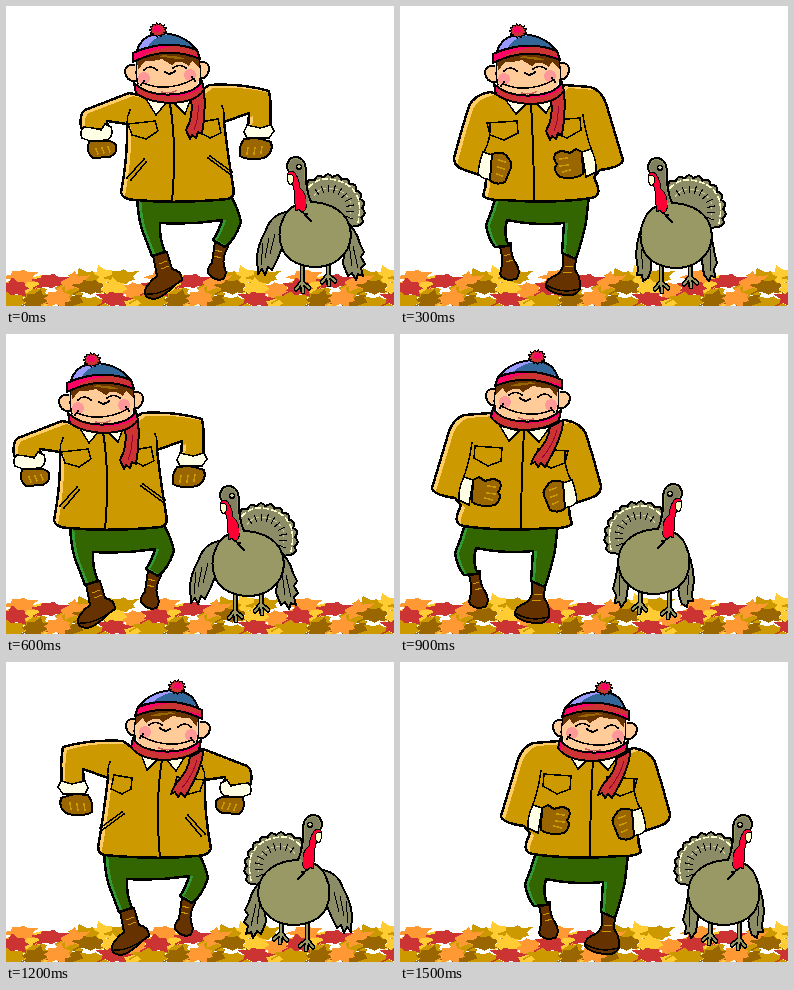
An HTML page for the animation above (1800 ms loop, 388 by 300 pixels).

```html
<!DOCTYPE html>
<html lang="en">
<head>
<meta charset="utf-8">
<title>Autumn dance</title>
<style>
html, body { margin: 0; width: 100%; height: 100%; overflow: hidden; background: #fff; }
svg { display: block; width: 388px; height: 300px; }
.pose { visibility: hidden; }
.ink { stroke: #000; stroke-width: 2; stroke-linejoin: round; stroke-linecap: round; }
.line { fill: none; stroke: #000; stroke-width: 1.5; stroke-linecap: round; stroke-linejoin: round; }
</style>
</head>
<body>
<svg id="stage" viewBox="0 0 388 300" shape-rendering="crispEdges"></svg>
<script>
const GOLD = '#cc9900', CREAM = '#ffffe6', RED = '#cc3333', PINK = '#ff0066', SKIN = '#ffcc99',
      GLOVE = '#996600', PANTS = '#336600', BOOT = '#663300', BIRD = '#999966', PLUME = '#8c8c66';

const ink = (fill, d, width = 2) =>
  `<path class="ink" fill="${fill}" style="stroke-width:${width}" d="${d}"/>`;
const line = (d, color = '#000', width = 1.5, extra = '') =>
  `<path class="line" style="stroke:${color};stroke-width:${width}" d="${d}" ${extra}/>`;
const flat = (fill, d) => `<path fill="${fill}" d="${d}"/>`;
const dot = (x, y, r, fill) => `<circle cx="${x}" cy="${y}" r="${r}" fill="${fill}"/>`;
const shift = (x, y, body) => `<g transform="translate(${x} ${y})">${body}</g>`;
// Mirrored parts land at x' = x - old position.
const place = (flip, x, y, body) =>
  `<g transform="translate(${x} ${y})${flip ? ' scale(-1 1)' : ''}">${body}</g>`;

// A shape lit from the left of the stage, also when it is mirrored.
const clips = {};
function lit(id, d, base, light, flip, dx, dy, width) {
  clips[id] = d;
  return flat(light, d)
    + `<g clip-path="url(#${id})">${shift(flip ? -dx : dx, dy, flat(base, d))}</g>`
    + ink('none', d, width);
}

// wave makes the spikes uneven.
function star(x, y, r, spikes, inner, turn, squash, wave = 0) {
  const pts = [];
  for (let i = 0; i < spikes * 2; i++) {
    const a = turn + i * Math.PI / spikes;
    const q = r * (i % 2 ? inner : 1 - wave + wave * Math.cos(i * 2.1));
    pts.push((x + q * Math.cos(a)).toFixed(1) + ' ' + (y + q * Math.sin(a) * squash).toFixed(1));
  }
  return 'M' + pts.join('L') + 'Z';
}

// Leaf carpet: one short tile, repeated.
function leaves() {
  const tints = { r: RED, o: '#ff9933', y: '#ffcc33', g: GOLD, b: GLOVE };
  const tile = [
    ['g', 6, 296], ['y', 32, 297], ['b', 66, 296], ['g', 88, 298], ['y', 128, 296], ['g', 140, 290],
    ['g', 62, 283], ['o', 128, 284], ['g', 28, 286], ['y', 25, 277], ['o', 15, 271], ['y', 98, 270],
    ['g', 116, 271], ['g', 80, 272], ['o', 68, 276], ['b', 84, 281], ['y', 108, 282], ['r', 44, 275],
    ['r', 9, 282], ['b', 30, 294], ['r', 108, 293], ['o', 52, 292]
  ];
  let out = '';
  for (let k = -1; k < 3; k++)
    tile.forEach(([c, x, y], i) => {
      out += flat(tints[c], star(x + k * 142, y, 20, 7, .55, i * 1.3, .55, .2));
      out += line(`M${x + k * 142 - 9} ${y + 3}l-7 4`, tints[c]);
    });
  return out;
}

const coats = {
  out: {
    shape: 'M146 92L123 87 79 104Q73 108 75 122L102 124 101 115 121 118Q122 150 115 187Q118 194 130 194Q170 198 222 193Q230 191 227 180Q222 150 218 116L243 107 242 122 264 122Q266 100 263 85Q235 77 203 79L185 92Z',
    details: line('M164 98Q171 140 166 196', '#000', 2)
      + line('M121 117Q121 110 124 104M218 116Q219 106 216 100')
      + line('M122 118L149 115 152 125 140 133 126 129ZM194 116L212 113 215 127 204 132 195 127Z')
      + line('M138 153L121 172M140 156L125 174M202 152L225 169M204 150L226 166'),
    collar: 'M140 93L150 109 160 97ZM168 97L179 108 185 92Z',
    cuffs: 'M78 121Q73 126 76 132L84 135 102 134Q108 129 105 121L99 118 95 124 87 122ZM241 119L238 126 241 132 263 132 268 125 265 119 254 122Z',
    gloves: 'M83 135Q80 148 87 152L104 151Q112 147 110 139Q104 133 98 135ZM238 133Q232 142 234 150Q242 155 258 152Q268 147 265 136Q256 133 250 132Z',
    fingers: 'M90 143l2 5M96 142l2 5M102 141l2 5M242 142l-1 6M249 142l-1 6M256 141l-1 6'
  },
  in: {
    shape: 'M112 93L90 86Q74 89 69 100Q61 125 54 152Q54 160 62 163L82 170 86 173Q86 182 83 190Q90 195 104 194Q150 198 192 192Q200 190 198 181L194 171 200 164Q222 161 223 154Q217 134 208 104Q203 84 190 81L165 79 150 93Z',
    details: line('M131 97Q134 150 134 196', '#000', 2)
      + line('M90 118Q91 134 84 146M183 109Q186 130 192 145')
      + line('M87 117L117 115 118 127 104 134 90 129ZM153 114L180 112 181 124 167 132 154 127Z'),
    collar: 'M105 93L116 108 127 97ZM136 97L146 107 155 92Z',
    cuffs: 'M83 146L92 149 92 174Q82 173 78 168Q79 156 83 146ZM182 146L191 143Q197 155 196 166L186 171Z',
    gloves: 'M92 148Q104 144 108 152Q114 158 110 164L105 176Q96 180 90 174ZM182 146L176 143 170 147Q160 143 155 148 153 154 157 158 152 164 160 171 174 174 183 168Z',
    fingers: 'M99 154l6 2M98 161l6 2M97 168l5 2M160 153l7-1M160 160l8-1M163 166l7-2'
  }
};

function coat(arms, flip) {
  const c = coats[arms];
  return lit('coat-' + arms, c.shape, GOLD, '#ffcc66', flip, 4, 3, 2.5) + c.details
    + ink(CREAM, c.collar, 1.5) + ink(CREAM, c.cuffs, 1.5) + ink(GLOVE, c.gloves)
    + line(c.fingers, GOLD);
}

const trousers = (arms, d) => lit('pants-' + arms, d, PANTS, '#339933', false, 4, 0, 2.5);
const legs = {
  out: ink(BOOT, 'M147 249L161 246 166 263Q176 265 176 274L169 279Q159 290 149 293Q138 293 139 284Q142 277 151 270Z')
    + ink(BOOT, 'M209 236L222 241Q216 251 218 260Q222 268 217 273Q209 276 202 267Q201 262 206 257Z')
    + trousers('out', 'M131 190Q132 215 138 229L146 250 159 246Q153 232 154 217Q185 219 216 214Q213 225 207 234L219 241Q229 234 235 216Q232 202 225 190Z')
    + line('M153 258l8-3M155 263l8-3M209 244l7 2M208 250l7 2', GOLD, 1)
    + line('M142 288q14 1 32-13'),
  in: ink(BOOT, 'M100 241L111 237Q110 250 117 259Q121 268 116 273Q104 276 100 268Q104 255 100 241Z')
    + ink(BOOT, 'M163 248L176 251 175 264Q181 271 180 283Q175 291 165 289Q152 288 146 281Q145 275 152 271Q161 268 163 260Z')
    + trousers('in', 'M96 190Q92 205 86 219Q88 233 95 241L109 240Q103 229 107 214Q135 220 164 217L162 247 176 253Q183 232 186 216L189 189Z')
    + line('M104 250l6-2M106 256l7-2M165 260l8 1M163 266l9 1', GOLD, 1)
    + line('M148 280q14 8 31 3')
};

const head = flip =>
  ink(SKIN, 'M132 59Q119 57 119 66Q121 77 132 75ZM192 57Q203 54 203 63Q202 73 192 73Z')
  + flat(SKIN, 'M130 52Q126 84 145 89Q163 94 182 88Q198 80 193 50Z')
  + line('M131 56Q129 68 132 78M193 55Q196 68 194 76')
  + dot(138, 72, 6, '#ff9999') + dot(184, 69, 6, '#ff9999')
  + flat(BOOT, 'M131 54Q145 44 160 44Q185 45 193 51L193 61 186 55 183 60Q172 52 166 59L156 53 146 55 139 55 132 64Z')
  + flat(GLOVE, 'M150 50Q166 48 180 53L172 53Z')
  + line('M138 64Q144 58 151 64M167 62Q173 57 180 62')
  + line('M159 66Q164 70 169 65', '#000', 2)
  + line('M137 77Q161 87 188 73M135 79l3-4M186 71l3 4')
  + line('M156 86Q163 88 170 85', '#cc6666')
  + lit('dome', 'M131 45Q135 29 155 27Q178 28 190 43Q160 34 131 45Z', '#336699', '#9999ff', flip, 9, 1)
  + lit('brim', 'M127 47Q160 32 191 44L194 53Q160 39 127 56Z', RED, PINK, flip, 12, 1)
  + ink(RED, star(152, 24, 9, 13, .72, .2, .8), 1)
  + flat(PINK, star(151, 23, 5, 7, .6, .4, .8))
  + lit('band', 'M128 77Q135 84 147 87Q166 91 184 85Q193 81 196 75L198 84Q190 96 165 97Q141 96 130 87Z', RED, PINK, flip, 3, 2);

const tails = {
  left: ink(RED, 'M185 92L198 84Q200 104 196 128L192 126 190 132 186 129 184 133 180 124Q188 110 185 92Z')
    + line('M192 98Q193 112 188 124', '#990033', 1),
  right: ink(RED, 'M184 94L197 87Q197 104 179 134L175 130 172 134 169 129 165 131Q167 124 172 118Q182 108 184 94Z')
    + line('M191 97Q187 112 176 125', '#990033', 1)
};

const claw = (x, foot) => {
  const d = `M${x} 258V${foot - 10}l-6 7M${x} ${foot - 10}l1 10M${x} ${foot - 10}l7 6`;
  return line(d, '#000', 5) + line(d, BIRD, 2);
};

// Scalloped fan, drawn as bumps along an arc.
function fan() {
  const at = (a, r) => `${(323 + r * Math.cos(a)).toFixed(1)} ${(204 + r * Math.sin(a)).toFixed(1)}`;
  let edge = 'M' + at(-2.3, 33), rays = '';
  for (let a = -2.3; a < .5; a += .28) {
    edge += `Q${at(a + .14, 39)} ${at(a + .28, 33)}`;
    rays += `M${at(a + .14, 18)}L${at(a + .14, 25)}`;
  }
  return ink(PLUME, edge + 'L323 224L303 196Z')
    + line('M303 181Q311 172 323 173Q345 175 352 192Q355 203 352 216', '#ffffcc', 1.5, 'stroke-dasharray="5 3"')
    + line('M308 190Q314 181 323 182Q338 183 344 195Q346 204 344 213', '#cccc99', 1, 'stroke-dasharray="3 3"')
    + line(rays, '#000', 1);
}

const turkey = (wings, feet) =>
  fan() + feet + wings
  + ink(BIRD, 'M281 162Q281 151 290 151Q300 152 300 166Q299 182 305 196Q329 197 340 212Q349 228 341 244Q330 261 309 261Q286 260 277 245Q270 228 277 213Q281 203 290 199Q290 185 286 172Z')
  + flat('#808060', 'M283 162Q283 153 290 153Q298 154 298 166Q298 182 303 195L293 201Q293 185 288 170Z')
  + line('M290 199Q294 207 301 208M299 209l6 6')
  + ink('#ff0033', 'M281 168Q284 163 289 167Q294 175 294 182Q301 187 300 198Q301 205 296 206L293 203 290 205Q288 196 289 188Q287 180 286 175Z', 1)
  + ink('#ffffcc', 'M282 169Q287 167 288 173Q287 178 284 179Q280 174 282 169Z', 1)
  + dot(293, 161, 3, '#000') + dot(293, 160.5, 1.6, '#cccc99');

const birds = {
  out: turkey(
    ink(PLUME, 'M280 206Q265 209 260 224Q252 238 251 251L252 268 256 263 259 269 262 261 266 264Q276 246 282 222Z')
    + ink(PLUME, 'M338 214Q350 222 354 238L358 246 355 251 359 258 355 262 357 270 352 268 350 274 346 267 342 270 337 258Q340 235 338 214Z')
    + line('M257 237l-2 22M263 232l-4 20M269 228l-5 20M347 240l5 22M343 238l3 22', '#000', 1),
    claw(296, 286) + claw(322, 279)),
  in: turkey(
    ink(PLUME, 'M281 210Q270 224 269 248L271 262 270 268 275 268 276 274 281 271Q287 260 283 240Z')
    + ink(PLUME, 'M336 214Q346 228 347 244L350 256 347 262 348 270 344 269 342 274 337 268Q332 240 336 214Z')
    + line('M274 242l2 20M343 242l1 22', '#000', 1),
    claw(294, 285) + claw(323, 280))
};

// [arms, facing right, coat x, legs x, legs y, head x, head y, turkey x, turkey y]
const steps = [
  ['out', 0, 0, 0, 0, 0, 0, 0, 0],
  ['in', 0, 0, 0, 0, -34, 1, -33, 1],
  ['out', 0, -67, -67, 1, -66, 2, -67, 1],
  ['in', 1, 255, -31, 0, 289, -1, 563, -1],
  ['out', 1, 320, -33, 0, 323, 1, 597, 2],
  ['in', 1, 324, 39, 3, 356, 2, 633, 2]
];
const STEP = 300;

function pose([arms, flip, cx, lx, ly, hx, hy, tx, ty]) {
  const tail = flip ? shift(hx - 323, hy, tails.right) : shift(hx, hy, tails.left);
  return `<g class="pose">${shift(lx, ly, legs[arms])}${place(flip, cx, 0, coat(arms, flip))}`
    + tail + place(flip, hx, hy, head(flip)) + place(flip, tx, ty, birds[arms]) + '</g>';
}

const stage = document.getElementById('stage');
const figures = steps.map(pose).join('');
const defs = Object.entries(clips)
  .map(([id, d]) => `<clipPath id="${id}"><path d="${d}"/></clipPath>`).join('');
stage.innerHTML = `<defs>${defs}</defs>${leaves()}${figures}`;

const poses = [...stage.querySelectorAll('.pose')];
function tick() {
  const now = Math.floor(performance.now() / STEP) % poses.length;
  poses.forEach((p, i) => { p.style.visibility = i === now ? 'visible' : 'hidden'; });
  requestAnimationFrame(tick);
}
tick();
</script>
</body>
</html>
```
